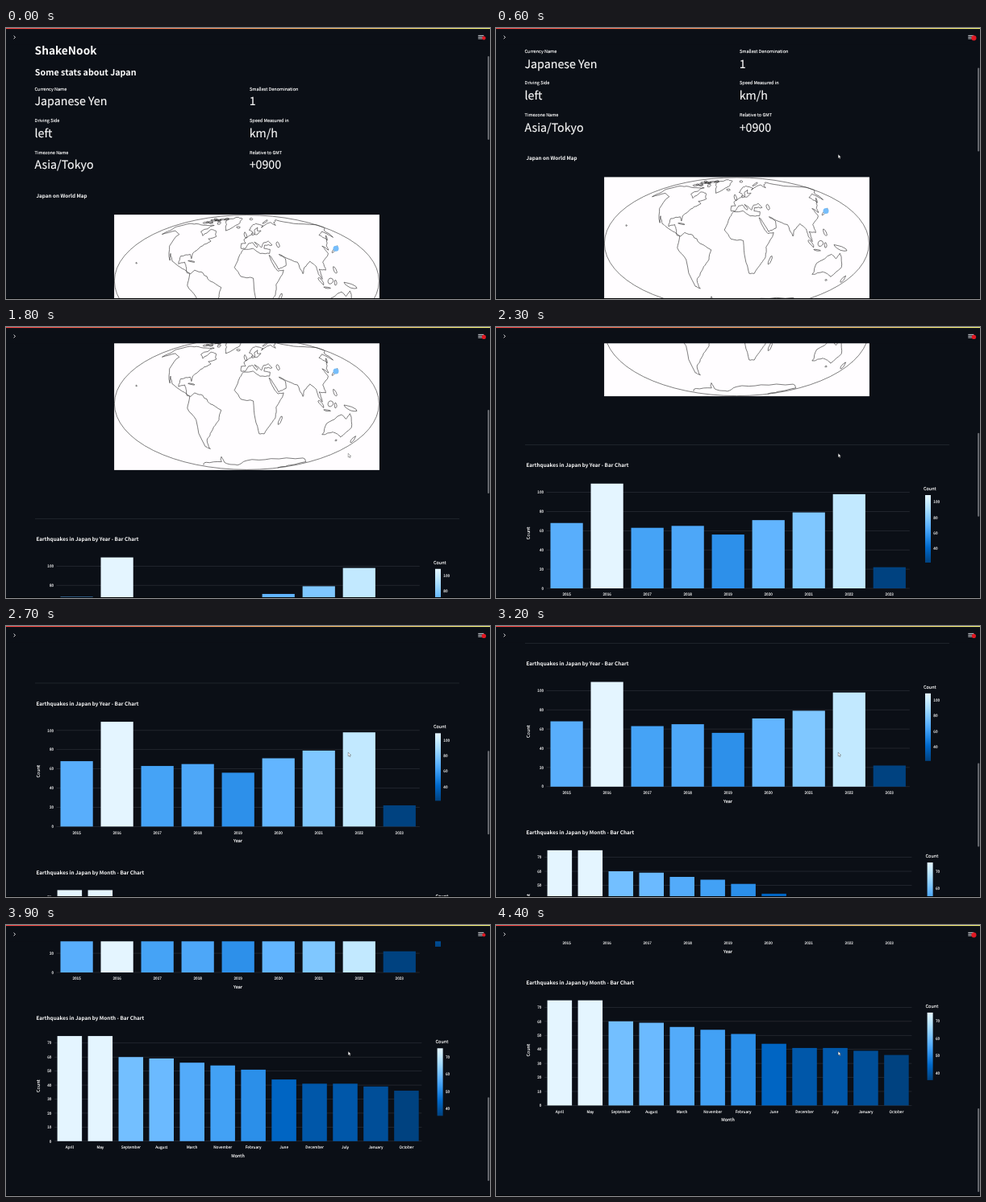
An HTML page for the animation above (4.5 s loop, 600 by 337 pixels).

```html
<!DOCTYPE html>
<html lang="en">
<head>
<meta charset="utf-8">
<title>Earthquake dashboard</title>
<style>
  html, body { margin: 0; width: 100%; height: 100%; overflow: hidden; background: #0b0f16; }
  svg { display: block; width: 100%; height: 100%; }
  text {
    font-family: "Noto Sans CJK JP", "Noto Sans CJK SC", "Noto Sans CJK", "Noto Sans", sans-serif;
    fill: #fafafa; stroke: #fafafa; stroke-width: .14px; text-rendering: geometricPrecision; white-space: pre;
  }
</style>
</head>
<body>
<svg id="stage" viewBox="0 0 600 337" preserveAspectRatio="none">
  <defs>
    <linearGradient id="scale" x1="0" y1="1" x2="0" y2="0"></linearGradient>
    <linearGradient id="stripe"><stop stop-color="#ff4b4b"/><stop offset="1" stop-color="#fffd80"/></linearGradient>
  </defs>
  <rect width="600" height="337" fill="#0b0f16"/>
  <g id="page"></g>
  <g id="header">
    <rect width="600" height="20.3" fill="#0b0f16"/>
    <rect width="600" height="1.1" fill="url(#stripe)"/>
    <path d="M9.6 9.6l1.9 1.9l-1.9 1.9" fill="none" stroke="#fafafa" stroke-width=".9"/>
    <path d="M585.3 9.4h7M585.3 11.3h7M585.3 13.2h7" stroke="#c9cbd0" stroke-width="1"/>
    <circle id="record" cx="592.4" cy="12.4" r="2.5" fill="#e01822"/>
  </g>
  <rect y="336" width="600" height="1" fill="#030406"/>
  <rect id="thumb" x="597" y="35" width="2.2" height="104" rx="1" fill="#63666c"/>
  <path id="cursor" d="M424.2 157.2v4.8l1.1-1l.8 1.7l.9-.4l-.8-1.7h1.5z" fill="#fff" stroke="#222" stroke-width=".35"/>
</svg>
<script>
const page = document.getElementById("page");
const LOOP = 4500;

function add(tag, attrs, parent = page) {
  const node = document.createElementNS("http://www.w3.org/2000/svg", tag);
  for (const key in attrs) node.setAttribute(key, attrs[key]);
  parent.appendChild(node);
  return node;
}

function label(str, x, y, size, extra = {}) {
  add("text", { x, y, "font-size": size, ...extra }).textContent = str;
}

const bold = { "font-weight": 700, "stroke-width": 0, style: "stroke: none" };
const middle = { "text-anchor": "middle" };
const end = { "text-anchor": "end" };

// Heading and metrics
label("ShakeNook", 35.6, 33.4, 13.7, bold);
label("Some stats about Japan", 35.8, 59, 10.7, bold);
[
  ["Currency Name", "Japanese Yen", "Smallest Denomination", "1"],
  ["Driving Side", "left", "Speed Measured in", "km/h"],
  ["Timezone Name", "Asia/Tokyo", "Relative to GMT", "+0900"]
].forEach(([nameA, valueA, nameB, valueB], row) => {
  const y = 77.6 + row * 39.5;
  label(nameA, 35.6, y, 5.53);
  label(valueA, 35.5, y + 18.8, 14.22);
  label(nameB, 302, y, 5.53);
  label(valueB, 301.7, y + 18.8, 14.22);
});

// World map: Mollweide projection, a few capes and bays joined by roughened lines
const MAP = { cx: 298.4, cy: 314.6, rx: 164, ry: 82 };

let seed = 7;
const random = () => (seed = seed * 16807 % 2147483647) / 2147483647;
const between = (a, b) => a + (b - a) * random();

function project(lon, lat) {
  const target = Math.PI * Math.sin(lat * Math.PI / 180);
  let a = target / 2;
  for (let i = 0; i < 12; i++) a -= (a + Math.sin(a) - target) / (1 + Math.cos(a));
  return [MAP.cx + MAP.rx * lon / 180 * Math.cos(a / 2), MAP.cy - MAP.ry * Math.sin(a / 2)];
}

const toPath = points => "M" + points.map(p => p.map(n => n.toFixed(1)).join(" ")).join("L");

function coast(line) {
  const keys = line.split(",").map(p => p.split(" ").map(Number));
  const points = [project(...keys[0])];
  for (let i = 1; i < keys.length; i++) {
    const [lonA, latA] = keys[i - 1], [lonB, latB] = keys[i];
    const rough = Math.min(.7, Math.hypot(lonB - lonA, latB - latA) * .05);
    for (let step = 1; step <= 4; step++) {
      const f = step / 4, wobble = step < 4 ? rough : 0;
      const [x, y] = project(lonA + (lonB - lonA) * f, latA + (latB - latA) * f);
      points.push([x + between(-wobble, wobble), y + between(-wobble, wobble)]);
    }
  }
  return toPath(points);
}

function island(lon, lat, rx, ry, tilt = 0) {
  const [x, y] = project(lon, lat), turn = tilt * Math.PI / 180;
  const points = Array.from({ length: 9 }, (_, i) => {
    const a = i / 9 * 2 * Math.PI, r = between(.75, 1.15);
    const u = rx * r * Math.cos(a), v = ry * r * Math.sin(a);
    return [x + u * Math.cos(turn) - v * Math.sin(turn), y + u * Math.sin(turn) + v * Math.cos(turn)];
  });
  return toPath(points) + "z";
}

const coasts = {
  americas: "-168 66,-157 71,-128 70,-98 68,-82 68,-94 59,-82 53,-78 62,-65 60,-56 52,-68 49,-61 46,-70 42,-76 36,-81 31,-80 25,-84 30,-97 28,-96 19,-88 21,-84 15,-82 9,-77 8,-72 12,-60 9,-50 0,-35 -7,-39 -18,-48 -26,-57 -36,-65 -42,-68 -53,-74 -50,-71 -18,-81 -5,-78 8,-94 16,-106 22,-114 31,-110 23,-124 40,-130 55,-150 60,-163 55,-162 60,-168 66",
  europe: "34 31,36 36,27 37,29 41,41 41,37 46,28 44,23 38,19 42,13 45,18 40,16 38,10 44,3 43,-2 37,-9 37,-9 43,-2 43,-5 48,8 54,11 57,10 54,21 55,30 60,22 60,25 65,17 61,15 55,11 59,5 61,14 68,25 71,41 67",
  asia: "41 67,34 65,44 68,70 73,73 68,80 73,104 77.5,130 71,180 69,180 65,163 60,157 51,155 59,137 54,140 48,128 40,126 35,121 40,122 31,108 21,109 12,100 13,103 2,98 8,97 16,90 22,80 15,77 8,72 21,57 26,48 30,56 25,55 17,44 13,35 28",
  africa: "35 28,33 29,39 15,43 11,51 12,40 -4,40 -15,35 -22,27 -34,19 -34,12 -17,9 3,-8 5,-17 15,-10 30,-5 36,10 37,20 31,34 31",
  australia: "114 -22,131 -12,139 -17,142 -11,153 -27,148 -38,138 -34,130 -32,116 -35,114 -22",
  greenland: "-70 77,-54 70,-44 60,-22 70,-18 80,-45 83,-70 77",
  antarctica: "-160 -78,-120 -73,-72 -72,-58 -64,-65 -75,-35 -78,0 -70,60 -67,135 -66,170 -72,163 -78,180 -84"
};
const islands = {
  britain: [-2.5, 54, 1.6, 3.8, -15], iceland: [-19, 65, 2.8, 1.2], caspian: [51, 42, 1.8, 4, -20],
  novaya: [57, 74, 4, .9, -35], svalbard: [18, 79, 2.2, 1.2], madagascar: [47, -19, 1.6, 5.4, 20],
  japan: [137, 36, 1.2, 5.6, 40], sakhalin: [143, 50, .7, 3.2, -15], philippines: [122, 12, 1.5, 5, -20],
  borneo: [114, 0, 3.6, 4], sumatra: [101, 0, 1.4, 6.6, -40], java: [110, -7.5, 4.2, .8, 8],
  sulawesi: [121, -2, 1.6, 3], guinea: [141, -5, 8, 2.3, 22], zealand: [172, -41, 1.3, 6, 38],
  tasmania: [146, -42, 1.2, 1], cuba: [-79, 22, 4, .7, 12], hawaii: [-156, 20, .8, .8]
};
const arctic = Array.from({ length: 13 }, () =>
  island(between(-122, -72), between(69, 80), between(1.5, 3.8), between(.6, 1.4), between(-20, 10)));

label("Japan on World Map", 37.4, 210.5, 6.33, bold);
add("rect", { x: 134.1, y: 232.1, width: 328.8, height: 165, fill: "#fffdff" });
add("ellipse", { ...MAP, fill: "none", stroke: "#2a2a2a", "stroke-width": .6 });
add("path", {
  d: [...Object.values(coasts).map(coast), ...Object.values(islands).map(i => island(...i)), ...arctic].join(""),
  fill: "none", stroke: "#262626", "stroke-width": .6, "stroke-linejoin": "round"
});
add("circle", { cx: 409, cy: 274.2, r: 3.5, fill: "#76bdfa" });
add("rect", { x: 36, y: 457.3, width: 526, height: .7, fill: "#272b33" });

// Bar charts
const BLUES = ["#004280", "#0054a3", "#0068c9", "#1c83e1", "#3d9df3", "#60b4ff", "#83c9ff", "#a6dcff", "#c7ebff", "#e4f5ff"];
BLUES.forEach((color, i) => add("stop", { offset: i / 9, "stop-color": color }, document.getElementById("scale")));

function shade(f) {
  const i = Math.min(8, Math.floor(f * 9));
  const channel = (color, k) => parseInt(color.substr(1 + 2 * k, 2), 16);
  return "rgb(" + [0, 1, 2].map(k => {
    const a = channel(BLUES[i], k);
    return Math.round(a + (channel(BLUES[i + 1], k) - a) * (f * 9 - i));
  }) + ")";
}

function barChart(c) {
  const values = c.bars.map(bar => bar[1]);
  const low = Math.min(...values), high = Math.max(...values);
  const pitch = (c.right - c.left) / values.length, width = pitch * .804;
  label(c.title, 37.4, c.titleY, 6.38, bold);
  for (let v = 0; v <= c.top; v += c.step) {
    const y = c.zero - v * c.unit;
    add("rect", { x: c.left, y: y - .3, width: c.right - c.left, height: .6, fill: "#30333b" });
    label(v, c.left - 3.5, y + 1.7, 4.7, end);
  }
  c.bars.forEach(([name, value], i) => {
    const center = c.left + (i + .5) * pitch, height = value * c.unit;
    add("rect", { x: center - width / 2, y: c.zero - height, width, height, fill: shade((value - low) / (high - low)) });
    label(name, center, c.zero + 9.4, 4.7, middle);
  });
  label(c.axis, 287.5, c.zero + 20, 5.5, middle);
  label("Count", 0, 0, 5.5, { ...middle, transform: `translate(41.8 ${c.zero - 68.6}) rotate(-90)` });

  label("Count", c.keyX - 2, c.keyY - 6, 5.5);
  add("rect", { x: c.keyX, y: c.keyY, width: 7, height: 84, fill: "url(#scale)" });
  for (let v = 40; v <= c.top; v += c.step)
    label(v, c.keyX + 10.3, c.keyY + 84 * (high - v) / (high - low) + 1.7, 4.7);
}

barChart({
  title: "Earthquakes in Japan by Year - Bar Chart", titleY: 485.4, axis: "Year",
  bars: [68, 109, 63, 65, 56, 71, 79, 98, 22].map((n, i) => [2015 + i, n]),
  zero: 636, unit: 1.195, top: 100, step: 20, left: 62.6, right: 512.8, keyX: 532, keyY: 520
});
barChart({
  title: "Earthquakes in Japan by Month - Bar Chart", titleY: 695.4, axis: "Month",
  bars: [["April", 75], ["May", 75], ["September", 60], ["August", 59], ["March", 56], ["November", 54],
    ["February", 51], ["June", 44], ["December", 41], ["July", 41], ["January", 39], ["October", 36]],
  zero: 845.8, unit: 1.743, top: 70, step: 10, left: 59.9, right: 515.4, keyX: 534.6, keyY: 730.3
});

// Scroll keys: time in ms, offset in px; the pauses fall after whole wheel clicks
const KEYS = [[0, 0], [600, 46.7], [1300, 133.4], [2300, 311], [2800, 392.4], [2900, 392.4],
  [3200, 436.2], [3300, 436.2], [3900, 577], [4400, 621.4], [LOOP, 621.4]];

const slope = i => KEYS[i + 1] && KEYS[i] ? (KEYS[i + 1][1] - KEYS[i][1]) / (KEYS[i + 1][0] - KEYS[i][0]) : 0;

// Harmonic mean of the neighbouring slopes keeps the curve smooth and monotone
function speed(i) {
  const a = slope(i - 1), b = slope(i);
  return a && b ? 2 * a * b / (a + b) : 0;
}

function scrollAt(t) {
  const i = KEYS.findIndex(key => key[0] > t) - 1;
  const [t0, p0] = KEYS[i], [t1, p1] = KEYS[i + 1];
  const span = t1 - t0, u = (t - t0) / span, w = 1 - u;
  return p0 * (1 + 2 * u) * w * w + p1 * u * u * (3 - 2 * u) + span * u * w * (speed(i) * w - speed(i + 1) * u);
}

const thumb = document.getElementById("thumb");
const record = document.getElementById("record");
const cursor = document.getElementById("cursor");

function draw(time) {
  const t = Math.floor(time % LOOP / 100) * 100;
  const offset = scrollAt(t);
  page.setAttribute("transform", `translate(0 ${-offset})`);
  thumb.setAttribute("y", 35 + offset * .3107);
  record.setAttribute("r", 2.6 + .5 * Math.cos((t - 600) / 950 * 2 * Math.PI));
  cursor.setAttribute("visibility", t < 100 ? "hidden" : "visible");
}

const start = performance.now();
function tick() {
  draw(performance.now() - start);
  requestAnimationFrame(tick);
}
tick();
</script>
</body>
</html>
```
